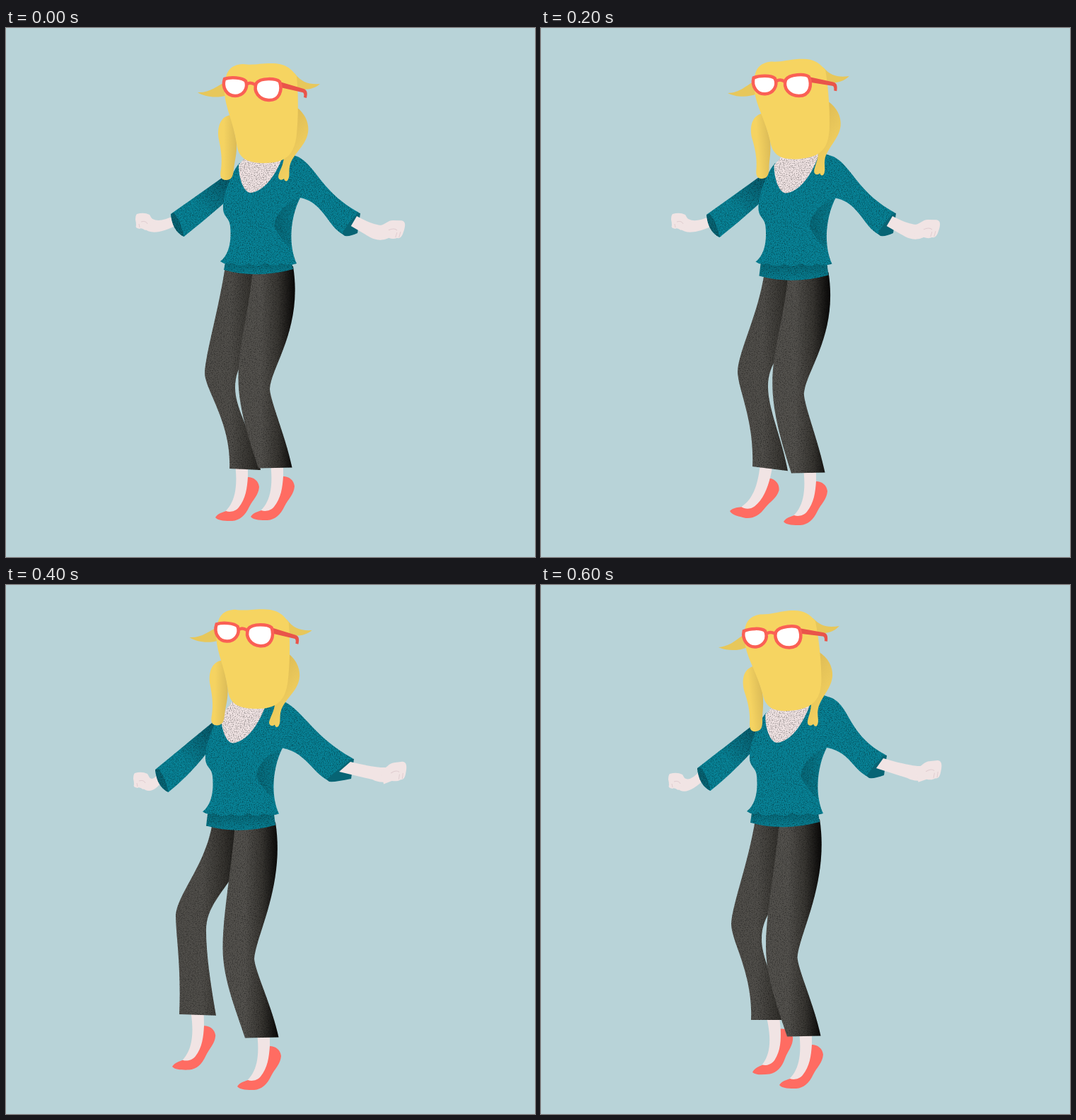
Animation of 748x748 px, one loop 0.7 s. Source, as an HTML page:

```html
<!DOCTYPE html>
<html lang="en">
<head>
<meta charset="utf-8">
<title>Dancing figure</title>
<style>
  html, body { margin: 0; width: 100%; height: 100%; overflow: hidden; background: #b8d3d8; }
  svg { display: block; width: 100vw; height: 100vh; }
</style>
</head>
<body>
<svg viewBox="0 0 748 748">
  <defs>
    <linearGradient id="backLegFill">
      <stop offset=".4" stop-color="#504e4a"/><stop offset=".72" stop-color="#35332f"/><stop offset="1" stop-color="#141311"/>
    </linearGradient>
    <linearGradient id="frontLegFill">
      <stop offset=".4" stop-color="#53514d"/><stop offset=".7" stop-color="#383632"/><stop offset=".97" stop-color="#0d0c0b"/>
    </linearGradient>
    <linearGradient id="sleeveFill" x1="0" y1="1" x2="1" y2="0">
      <stop offset=".45" stop-color="#088397"/><stop offset=".85" stop-color="#075f70"/>
    </linearGradient>
    <linearGradient id="sideShade">
      <stop offset="0" stop-color="#06606f" stop-opacity=".75"/><stop offset="1" stop-color="#06606f" stop-opacity=".1"/>
    </linearGradient>
    <linearGradient id="hemFill" x1="0" y1="0" x2="0" y2="1">
      <stop offset=".3" stop-color="#076a7a"/><stop offset="1" stop-color="#088195"/>
    </linearGradient>
    <linearGradient id="leftLimbFill">
      <stop offset=".3" stop-color="#f5d361"/><stop offset="1" stop-color="#dbbb57"/>
    </linearGradient>
    <linearGradient id="rightLimbFill" x1="1" y1="1" x2=".5" y2="0">
      <stop offset=".3" stop-color="#f3d160"/><stop offset="1" stop-color="#dcba54"/>
    </linearGradient>
    <filter id="grain" filterUnits="userSpaceOnUse" x="0" y="0" width="748" height="748" color-interpolation-filters="sRGB">
      <feTurbulence type="fractalNoise" baseFrequency=".7" numOctaves="2" seed="4"/>
      <feColorMatrix values="0 0 0 0 0  0 0 0 0 0  0 0 0 0 0  1.1 0 0 0 -.5"/>
      <feComposite in2="SourceGraphic" operator="in" result="specks"/>
      <feMerge><feMergeNode in="SourceGraphic"/><feMergeNode in="specks"/></feMerge>
    </filter>
    <g id="foot">
      <path fill="#f1e4e4" d="M28-75H46C46-50 47-35 38-18L28-5H10C24-16 33-34 28-75Z"/>
      <path fill="#ff6c62" d="M0 0C4-6 10-7 15-9C20-7 28-8 33-14C43-26 45-42 46-57C54-57 61-52 62-43C61-31 53-25 48-15C42-2 34 4 24 5C15 5 4 5 0 0Z"/>
    </g>
  </defs>

  <rect width="748" height="748" fill="#b8d3d8"/>
  <use id="backFoot" href="#foot"/>
  <use id="frontFoot" href="#foot"/>
  <g filter="url(#grain)">
    <path id="backLeg" fill="url(#backLegFill)"/>
    <path id="frontLeg" fill="url(#frontLegFill)"/>
  </g>

  <path id="cuffInside" fill="#076474"/>
  <g fill="#f1e4e4">
    <path id="leftForearm"/>
    <path id="rightForearm"/>
    <g id="leftFist">
      <path d="M-10-10Q0-13 8-9Q11-4 14 2L2 13Q-4 9-6 11Q-13 10-11 6Q-11 2-12-2Q-12-8-10-10Z"/>
      <path d="M-4 1Q3-1 5 4M-7 4L-6 9" fill="none" stroke="#e0cdd0"/>
    </g>
    <g id="rightFist">
      <path d="M-22-5C-13-6-10-13-2-13L10-13C17-12 15-4 14 0C12 6 11 13 4 12C0 14-4 13-8 12L-20 15Z"/>
      <path d="M-8 1Q0-3 4 1M4 4L2 11M9 3L7 11" fill="none" stroke="#e0cdd0"/>
    </g>
  </g>

  <g filter="url(#grain)">
    <path id="leftSleeve" fill="url(#sleeveFill)"/>
    <path id="leftCuff" fill="#076474"/>
    <path id="rightSleeve" fill="#088296"/>
    <g id="torso">
      <path id="underHem" fill="url(#hemFill)"/>
      <path fill="#088296" d="M330 191C318 205 306 238 307 256C308 268 316 268 317 280C319 300 316 320 303 330q8 6 16 2q12 8 24 1q12 7 24-1q11 7 22 1q10 4 22 0C398 305 403 265 416 240L416 184L390 182Z"/>
      <path fill="url(#sideShade)" d="M416 240C396 246 382 262 379 280C386 294 395 306 403 310C402 280 406 258 416 240Z"/>
      <path id="neck" fill="#f1e4e4"/>
    </g>
  </g>

  <g id="head">
    <g filter="url(#headGrain)">
      <path fill="url(#leftLimbFill)" d="M318 123C302 125 298 142 301 158C304 172 306 185 304 200C302 210 304 215 311 215C319 215 321 210 322 200C323 188 327 178 326 160Z"/>
      <path fill="url(#rightLimbFill)" d="M411 112C424 122 429 136 427 148C424 166 408 176 402 192C399 202 402 208 399 214C397 218 394 217 393 213C390 216 385 215 385 210C386 203 392 195 393 183L408 150Z"/>
      <path fill="#e7c75b" d="M271 91C288 92 298 82 311 76L312 95C298 100 280 97 271 91Z"/>
      <path fill="#e7c75b" d="M408 64C418 77 428 80 444 79C435 87 424 88 409 86Z"/>
      <path fill="#f6d461" d="M309 80C311 60 318 52 335 51C350 53 358 50 375 50C395 50 403 57 411 68C414 100 413 130 411 150C408 180 395 191 365 191C338 191 328 182 326 163C322 135 310 112 309 92Z"/>
    </g>
    <path fill="#e9544a" d="M387 76L421 86C427 88 426 94 425 99L421 98C422 94 421 91 419 91L388 84Z"/>
    <g fill="#fff" stroke="#fa6055" stroke-width="4.5">
      <path d="M341 79Q346 76 352 80" fill="none"/>
      <path d="M309 72C318 69 334 70 339 75C343 86 335 96 324 96C312 96 305 84 309 72Z"/>
      <path d="M354 78C360 70 382 71 387 76C391 88 387 103 371 102C358 101 349 90 354 78Z"/>
    </g>
  </g>
</svg>

<script>
const STEP = 100;

// One entry per beat of the dance.
const tracks = {
  torso: [[0, 0, 0], [3, 1.5, .5], [.5, .5, 8], [-9, -2.5, 8], [-25, -9.5, 8], [-24, -11.5, 7], [-12, -10, 4]], // x, y, hem drop
  head: [[357, 86, 0], [356.5, 90.5, -5], [349.5, 81, -4], [360, 75.5, 5], [345.5, 70, .7], [325.5, 75, -6], [336, 74, -6]],
  rightCuff: [[501, 262, -22], [507, 263, -24], [502, 262, -22], [494, 260, -23], [492, 246, -35], [491, 243, -34], [489, 241, -25]],
  rightHand: [[549, 285], [553, 281], [549, 284], [556, 298], [552, 264], [552, 262], [552, 262]],
  leftCuff: [[233, 263], [231, 262], [234, 264], [225, 259], [211, 261], [211, 259], [221, 259]],
  leftHand: [[195, 273], [191, 273], [196, 273], [187, 270], [192, 276], [191, 274], [192, 277]],
  backKnee: [[281, 487, 310], [285, 487, 318], [278, 485, 316], [257, 478, 309], [240, 467, 292], [241, 467, 284], [269, 479, 303]], // x, y, hip x
  backAnkle: [[316, 623, 360], [312, 621, 351], [299, 620, 349], [263, 618, 314], [245, 607, 297], [256, 604, 308], [297, 615, 345]], // x, y, inner x
  backToe: [[296, 692, 0], [293, 690, 0], [267, 683, 12], [224, 679, 16], [235, 681, -1], [251, 679, -3], [299, 689, -6]],
  frontToe: [[346, 691], [343, 689], [343, 698], [344, 702], [327, 709], [328, 707], [337, 707]]
};
const sharpNeckBeat = 1;
const beats = tracks.torso.length;

const el = id => document.getElementById(id);
const draw = (id, d) => el(id).setAttribute('d', d);
const place = (id, x, y, angle = 0) =>
  el(id).setAttribute('transform', `translate(${x} ${y}) rotate(${angle})`);

function drawLegs(p) {
  const [tx, ty, drop] = p.torso;
  const waist = ty + drop + 337;
  const [kx, ky, hip] = p.backKnee;
  const [ax, ay, inner] = p.backAnkle;
  const innerY = ay + 2 + p.backToe[2] * .35;
  const [ix, iy] = [kx + 43, ky + 22];
  draw('backLeg', `M${hip} ${waist}C${hip - 9} ${waist + 60} ${kx + 2} ${ky - 30} ${kx} ${ky}
    C${kx} ${ky + 25} ${ax + 3} ${ay - 65} ${ax} ${ay}L${inner} ${innerY}
    C${inner - 8} ${innerY - 45} ${ix} ${iy + 32} ${ix} ${iy}
    C${ix} ${iy - 35} ${ix + 22} ${iy - 50} ${ix + 48} ${iy - 95}L${tx + 360} ${waist}Z`);

  const [fx, fy] = [p.frontToe[0] + 11, p.frontToe[1] - 68.5];
  const front = tx + 328 + (fx - tx - 356) / 2;
  const back = front + 44.5;
  const knee = fy - 112;
  draw('frontLeg', `M${tx + 349} ${waist}C${tx + 345} ${waist + 60} ${front} ${knee - 65} ${front} ${knee - 15}
    C${front} ${knee + 30} ${fx - 11} ${fy - 35} ${fx} ${fy}L${fx + 47.5} ${fy - 1}
    C${fx + 39} ${fy - 43} ${back + 1} ${knee + 18} ${back} ${knee}
    C${back + 2} ${knee - 32} ${tx + 420} ${waist + 88} ${tx + 406} ${waist}Z`);

  place('backFoot', ...p.backToe);
  place('frontFoot', ...p.frontToe);
}

function drawRightArm(p) {
  const [tx, ty] = p.torso;
  const [cx, cy, slant] = p.rightCuff;
  const [hx, hy] = p.rightHand;
  const [bx, by] = [cx + slant, cy + 32];
  const lift = Math.max(0, 262 - cy + ty);
  const [sx, sy] = [tx + 413 + lift, ty + 182 - lift * 1.1];
  const [px, py] = [tx + 416, ty + 240];
  const tilt = Math.atan2(hy - cy, hx - cx) * 180 / Math.PI - 24;

  draw('cuffInside', `M${cx - 12} ${cy - 4}L${cx} ${cy}L${cx - 4} ${cy + 28}Q${bx + 8} ${by + 1} ${bx} ${by}L${bx - 8} ${by - 6}Z`);
  draw('rightForearm', `M${cx - 5} ${cy + 4}Q${hx - 28} ${hy - 5} ${hx - 14} ${hy - 6}L${hx - 8} ${hy + 12}
    Q${hx - 20} ${hy + 18} ${hx - 34} ${hy + 11}L${cx + slant * .6} ${cy + 18}Z`);
  place('rightFist', hx, hy, tilt);
  draw('rightSleeve', `M${tx + 386} ${ty + 184}L${sx - 12} ${sy - 4}L${sx} ${sy}
    C${sx + 26} ${sy + 14} ${cx - 55} ${cy - 30} ${cx - 2} ${cy - 1}
    Q${cx - 14} ${cy + 8} ${bx - 4} ${by - 3}
    C${bx - 24} ${by - 14} ${px + 32} ${py + 6} ${px} ${py}L${tx + 395} ${ty + 236}Z`);
}

function drawLeftArm(p) {
  const [tx, ty] = p.torso;
  const [cx, cy] = p.leftCuff;
  const [hx, hy] = p.leftHand;
  const [bx, by] = [cx + 18.5, cy + 32];
  draw('leftForearm', `M${hx + 7} ${hy - 8}Q${hx + 16} ${hy + 6} ${cx + 5} ${cy + 2}L${cx + 12} ${cy + 14}
    Q${hx + 14} ${hy + 23} ${hx + 1} ${hy + 11}Z`);
  place('leftFist', hx, hy);
  draw('leftSleeve', `M${cx} ${cy}L${tx + 318} ${ty + 203}L${tx + 326} ${ty + 230}L${tx + 309} ${ty + 247}
    Q${bx + 28} ${by - 22} ${bx} ${by}Q${cx + 3} ${by - 8} ${cx} ${cy}Z`);
  draw('leftCuff', `M${cx} ${cy}Q${cx + 2} ${by - 8} ${bx} ${by}Q${bx - 3} ${cy + 13} ${cx + 5} ${cy - 1}Z`);
}

function drawTorso(p, sharp) {
  const [tx, ty, drop] = p.torso;
  place('torso', tx, ty);
  draw('underHem', `M311 326L308 ${342 + drop}Q355 ${355 + drop} 406 ${341 + drop}L403 326Z`);
  draw('neck', 'M345 174Q334 189 329 193' + (sharp
    ? 'C334 212 342 224 346 233C360 220 376 203 388 188L392 178Z'
    : 'C329 215 337 233 346 233C365 231 382 208 392 180L388 174Z'));
}

function pose(beat) {
  const p = {};
  for (const name in tracks) p[name] = tracks[name][beat];
  drawLegs(p);
  drawRightArm(p);
  drawLeftArm(p);
  drawTorso(p, beat === sharpNeckBeat);
  const [x, y, angle] = p.head;
  el('head').setAttribute('transform', `translate(${x} ${y}) rotate(${angle}) translate(-357 -86)`);
}

let shown = -1;
const start = performance.now();
function tick() {
  const beat = Math.floor((performance.now() - start) / STEP) % beats;
  if (beat !== shown) pose(shown = beat);
  requestAnimationFrame(tick);
}
tick();
</script>
</body>
</html>
```
